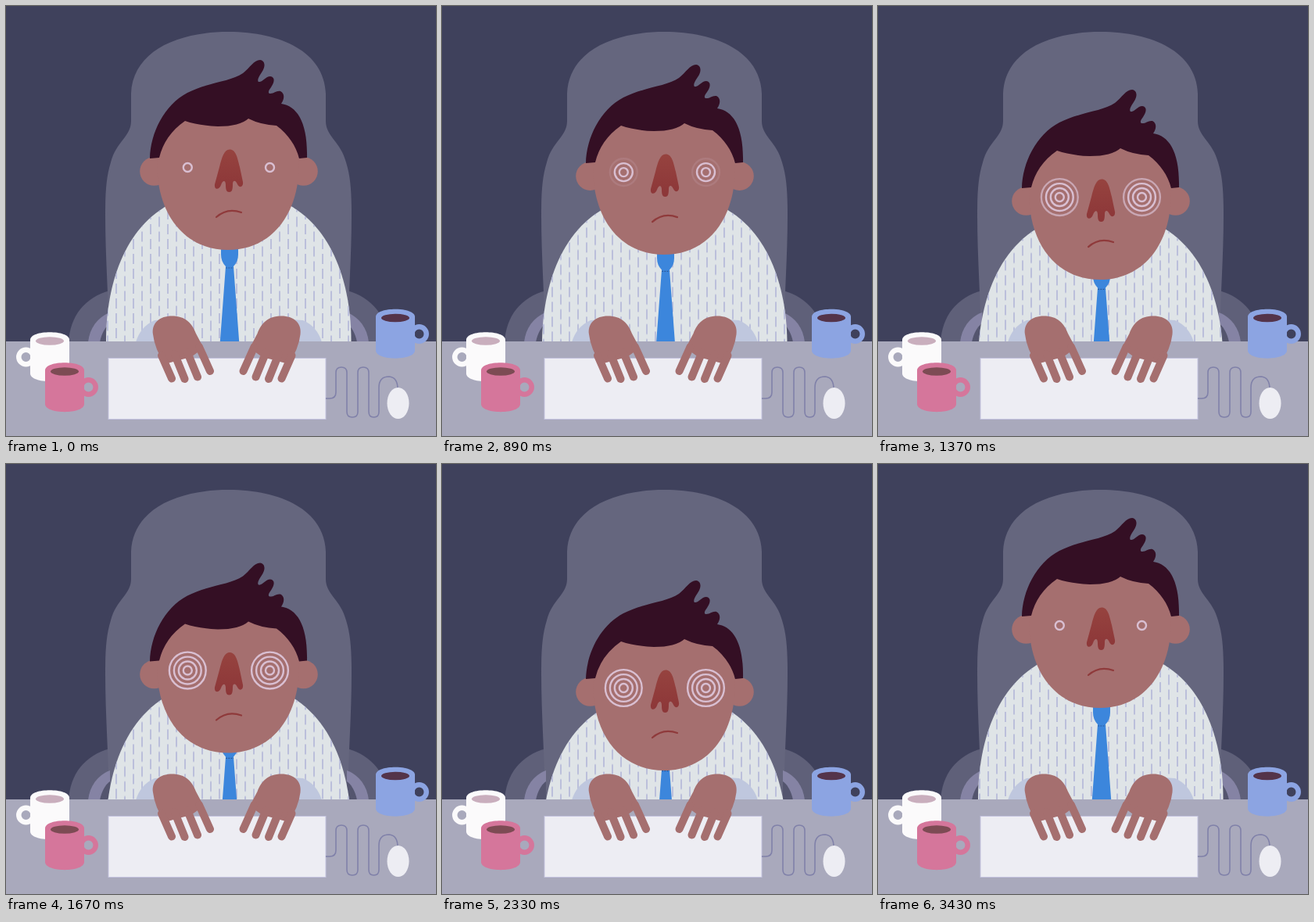
An HTML page for the animation above (5430 ms loop, 550 by 550 pixels).

```html
<!DOCTYPE html>
<html lang="en">
<head>
<meta charset="utf-8">
<title>Tired at the desk</title>
<style>
@property --drop { syntax: "<number>"; inherits: true; initial-value: 0; }
@property --rings { syntax: "<number>"; inherits: true; initial-value: 0; }

html, body { margin: 0; width: 100%; height: 100%; overflow: hidden; background: #3f415c; }
svg {
  display: block; width: 100%; height: 100%;
  animation: slump 5430ms linear infinite, daze 5430ms linear infinite;
}
.head { transform: translateY(calc(var(--drop) * 1px)); }
.body { transform: translateY(calc(var(--drop) * .72px)); }
.ring { opacity: clamp(0, var(--rings) - var(--i), 1); }

/* sink slowly, doze, jerk awake */
@keyframes slump {
  0% { --drop: 0; }
  9.21% { --drop: 0; animation-timing-function: cubic-bezier(.5, 0, .5, .25); }
  25.23% { --drop: 38; }
  30.76% { --drop: 57.5; animation-timing-function: cubic-bezier(.3, .45, .6, 1); }
  40.7% { --drop: 80; }
  50.28% { --drop: 80; animation-timing-function: cubic-bezier(.45, 0, .6, 1); }
  59.48%, 100% { --drop: 0; }
}
@keyframes daze {
  0%, 9.21% { --rings: 0; }
  16.39% { --rings: 1.15; }
  25.23% { --rings: 2.7; }
  26.89% { --rings: 3; }
  54.33% { --rings: 3; animation-timing-function: ease-in; }
  59.48%, 100% { --rings: 0; }
}

.skin { fill: #a56f6f; }
.finger { fill: none; stroke: #a56f6f; stroke-width: 10; stroke-linecap: round; }
.eye { fill: none; stroke: #d9bfd2; stroke-width: 2.4; }
.hair { fill: #340f24; }
.tie { fill: #3c86dc; }
.paper { fill: #ededf3; }
.handle { fill: none; stroke-width: 6.5; }
</style>
</head>
<body>
<svg viewBox="0 0 550 550">
  <defs>
    <pattern id="stripes" width="22" height="19" x="140" y="260" patternUnits="userSpaceOnUse">
      <path d="M1 0V13M12 9.5V19M12 0V3.5" stroke="#b7bcda" stroke-width="1.8"/>
    </pattern>
    <linearGradient id="noseTone" x2="0" y2="1">
      <stop offset="0" stop-color="#96433f"/>
      <stop offset="1" stop-color="#8c3638"/>
    </linearGradient>
    <g id="eye" class="eye">
      <circle r="5.5"/>
      <circle class="ring" style="--i:0" r="11.5"/>
      <circle class="ring" style="--i:1" r="17.4"/>
      <circle class="ring" style="--i:2" r="23.4"/>
    </g>
    <path id="arm" fill="#5f6079" d="M80 430C82 397 100 373 133 364V430Z"/>
    <g id="armpad">
      <path fill="#8583a4" d="M105 430C107 412 117 398 133 392V430Z"/>
      <path fill="#54556e" d="M120 430C122 419 127 410 133 406V430Z"/>
    </g>
    <path id="shirt" d="M128 500V428C128 360 150 270 232 244H337.500C419.500 270 441.500 360 441.500 428V500Z"/>
    <path id="cuff" fill="#bfc7de" d="M166 430Q172 410 190 402L220 400V430Z"/>
    <g id="hand">
      <path class="skin" d="M188 420C186 405 197 396.500 212 396.500C230 396.500 238 406 243 419L252 436Q242 449 225 452L203 458Q190 438 188 420Z"/>
      <path class="finger" d="M199 447L212 476.500M215.500 445L228.500 477M232 443L245 474.500M247 436L261 467"/>
    </g>
    <g id="cup">
      <path d="M-25 10C-25-3 25-3 25 10V53C25 66.500-25 66.500-25 53Z"/>
      <ellipse cy="11.500" rx="18" ry="5.200" fill="var(--drink)"/>
    </g>
  </defs>

  <rect width="550" height="550" fill="#3f415c"/>

  <use href="#arm"/>
  <use href="#arm" transform="matrix(-1 0 0 1 569 0)"/>
  <path fill="#65667e" d="M160 112C162 59 217 33 284.500 33S407 59 409 112V147C409 167 428 173 435 200C441 219 442 240 442 268C442 320 438 370 437 430H132C131 370 127 320 127 268C127 240 128 219 134 200C141 173 160 167 160 147Z"/>
  <use href="#armpad"/>
  <use href="#armpad" transform="matrix(-1 0 0 1 569 0)"/>

  <g class="body">
    <use href="#shirt" fill="#dfe4e7"/>
    <use href="#shirt" fill="url(#stripes)"/>
    <path class="tie" d="M275 300H297V318Q297 327 291 333L299 440H273L281 333Q275 327 275 318Z"/>
    <path d="M281.500 335H291" stroke="#29528f" stroke-width="1.200" stroke-dasharray="1.500 1.500"/>
  </g>

  <g class="head">
    <circle class="skin" cx="189.500" cy="211.500" r="18.300"/>
    <circle class="skin" cx="380.500" cy="211.500" r="18.300"/>
    <path class="skin" d="M193 200C193 165 215 135 284 135S375 165 375 200C375 270 337 312 284 312S193 270 193 200Z"/>
    <path class="hair" d="M184 195C185 162 202 127 232 111C260 97 287 97 303 86C312 79 317 69 325 69C332 70 332 78 327 85C323 91 321 95 323 97C328 98 332 90 338 90C345 91 343 98 339 104C335 109 335 112 338 112C343 112 346 108 351 109C357 112 356 119 352 125C372 128 386 148 385 194L375 195C371 179 361 164 346 153Q326 152 310 144Q299 154 271 154Q247 153 229 147Q203 165 196 194Z"/>
    <use href="#eye" x="232.300" y="206.500"/>
    <use href="#eye" x="337.500" y="206.500"/>
    <path fill="url(#noseTone)" d="M286 183.500C294 183.500 296 194 299 206L303 225C304 232 298 233 296 228C294 223 290 222 290 228C290 235 289 238 285.500 238S281 235 281 229C281 222 277 223 275 229C273 235 266 236 267 228L273 206C276 194 279 183.500 286 183.500Z"/>
    <path fill="none" stroke="#8f3a3b" stroke-width="2.200" stroke-linecap="round" d="M269 270Q283 257.500 301 264"/>
  </g>

  <use href="#cuff"/>
  <use href="#cuff" transform="matrix(-1 0 0 1 570 0)"/>
  <rect y="429" width="550" height="121" fill="#a9a9bc"/>

  <rect class="paper" x="131" y="450.500" width="278" height="78" stroke="#c3c2de"/>
  <path fill="none" stroke="#8081a9" stroke-width="1.600" d="M409 502H414Q422 502 422 494V469Q422 462 429 462T436 469V519Q436 526 443 526T450 519V469Q450 462 457 462T464 469V519Q464 526 470.500 526T477 519V488Q477 474 490 474Q501 475 501 490"/>
  <ellipse class="paper" cx="501.500" cy="508" rx="14" ry="20"/>

  <use href="#hand"/>
  <use href="#hand" transform="matrix(-1 0 0 1 564.500 0)"/>

  <g fill="#fbfafb" stroke="none" style="--drink:#c9aebd">
    <circle class="handle" cx="25.500" cy="449" r="9.200" stroke="#fbfafb"/>
    <use href="#cup" x="56" y="417"/>
  </g>
  <g fill="#d5769b" style="--drink:#7d4b54">
    <circle class="handle" cx="105.500" cy="487.500" r="9.200" stroke="#d5769b"/>
    <use href="#cup" x="75" y="456"/>
  </g>
  <g fill="#8ca4e2" style="--drink:#54344a">
    <circle class="handle" cx="528.500" cy="419.500" r="9.200" stroke="#8ca4e2"/>
    <use href="#cup" x="498" y="387.500"/>
  </g>
</svg>
</body>
</html>
```
